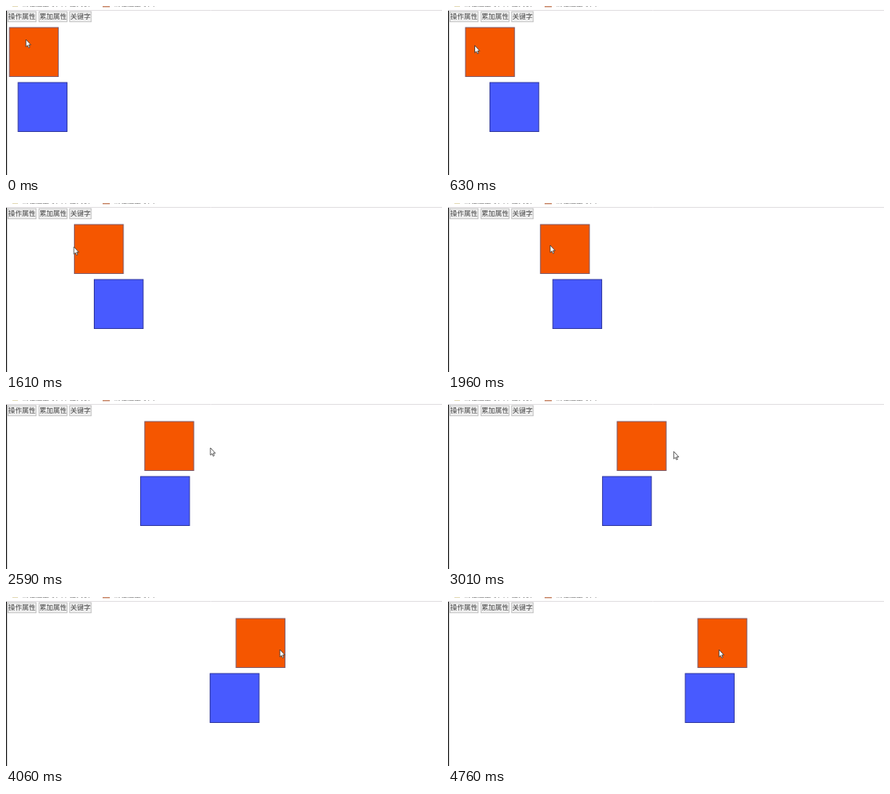
These frames come from a looping animation (546 px wide and 212 px high, 4.83 s). An HTML page:

```html
<!DOCTYPE html>
<html lang="zh">
<head>
<meta charset="utf-8">
<style>
  html, body { margin: 0; height: 100%; overflow: hidden; background: #fff; }
  svg { display: block; }
  text { font: 8.5px "Noto Sans CJK SC", "Noto Sans CJK", sans-serif; fill: #444; }
  .button { fill: #f0f0f0; stroke: #b4b4b4; stroke-width: .8; }
  .bar text { fill: #777; }
</style>
</head>
<body>
<svg width="546" height="212" viewBox="0 0 546 212">
  <g class="bar">
    <rect x="8" width="7" height="1" fill="#e2d9b5"/>
    <text x="20" y="0.4">请在这里导入书签列表</text>
    <rect x="121" width="9" height="1.5" fill="#c98a6c"/>
    <text x="135" y="0.4">请在这里导入</text>
  </g>
  <path d="M0 5.5H546" stroke="#e0dde0"/>
  <path d="M.6 6V212" stroke="#111" stroke-width="1.2"/>

  <rect class="button" x="2.4" y="7" width="35.4" height="12.8"/>
  <rect class="button" x="41.2" y="7" width="35.2" height="12.8"/>
  <rect class="button" x="79.8" y="7" width="27" height="12.8"/>
  <text x="3.1" y="16.4">操作属性</text>
  <text x="41.9" y="16.4">累加属性</text>
  <text x="80.6" y="16.4">关键字</text>

  <g id="swing" fill="#f55600" stroke="#7f5c6c">
    <rect x=".5" y="27" width="61.3" height="61.5"/>
  </g>
  <g id="linear" fill="#485aff" stroke="#30389f">
    <rect x=".5" y="96" width="61.3" height="61.5"/>
  </g>
  <path id="cursor" d="M0 0V9.2L2 7.4L3.4 10.4L4.8 9.8L3.5 6.8H6.2Z" fill="#fff" stroke="#333" stroke-width=".8"/>
</svg>
<script>
  const STEP = 70, LOOP = 4830;
  // Both boxes travel the same distance in the same time; the loop starts shortly after they set off.
  const DURATION = 5275, HEAD_START = 203, DISTANCE = 312.5, LEFT = 2.6;

  // Pointer stops: [time, x, y]
  const stops = [[0, 25, 42], [1260, 42, 57], [1960, 128, 53], [2590, 256, 60],
    [3500, 314, 70], [4060, 343, 66], [LOOP, 339, 66]];

  const swing = p => 0.5 - Math.cos(Math.PI * p) / 2;
  const mix = (a, b, k) => a + (b - a) * k;

  function place(id, x, y = 0) {
    document.getElementById(id).setAttribute("transform", `translate(${x} ${y})`);
  }

  function pointerAt(time) {
    const next = stops.findIndex(stop => stop[0] > time);
    const [t0, x0, y0] = stops[next - 1], [t1, x1, y1] = stops[next];
    const k = (time - t0) / (t1 - t0);
    return [mix(x0, x1, k), mix(y0, y1, k)];
  }

  function draw() {
    const time = Math.floor((performance.now() % LOOP) / STEP) * STEP;
    const progress = (time + HEAD_START) / DURATION;
    place("linear", LEFT + DISTANCE * progress);
    place("swing", LEFT + DISTANCE * swing(progress));
    place("cursor", ...pointerAt(time));
    requestAnimationFrame(draw);
  }
  draw();
</script>
</body>
</html>
```
